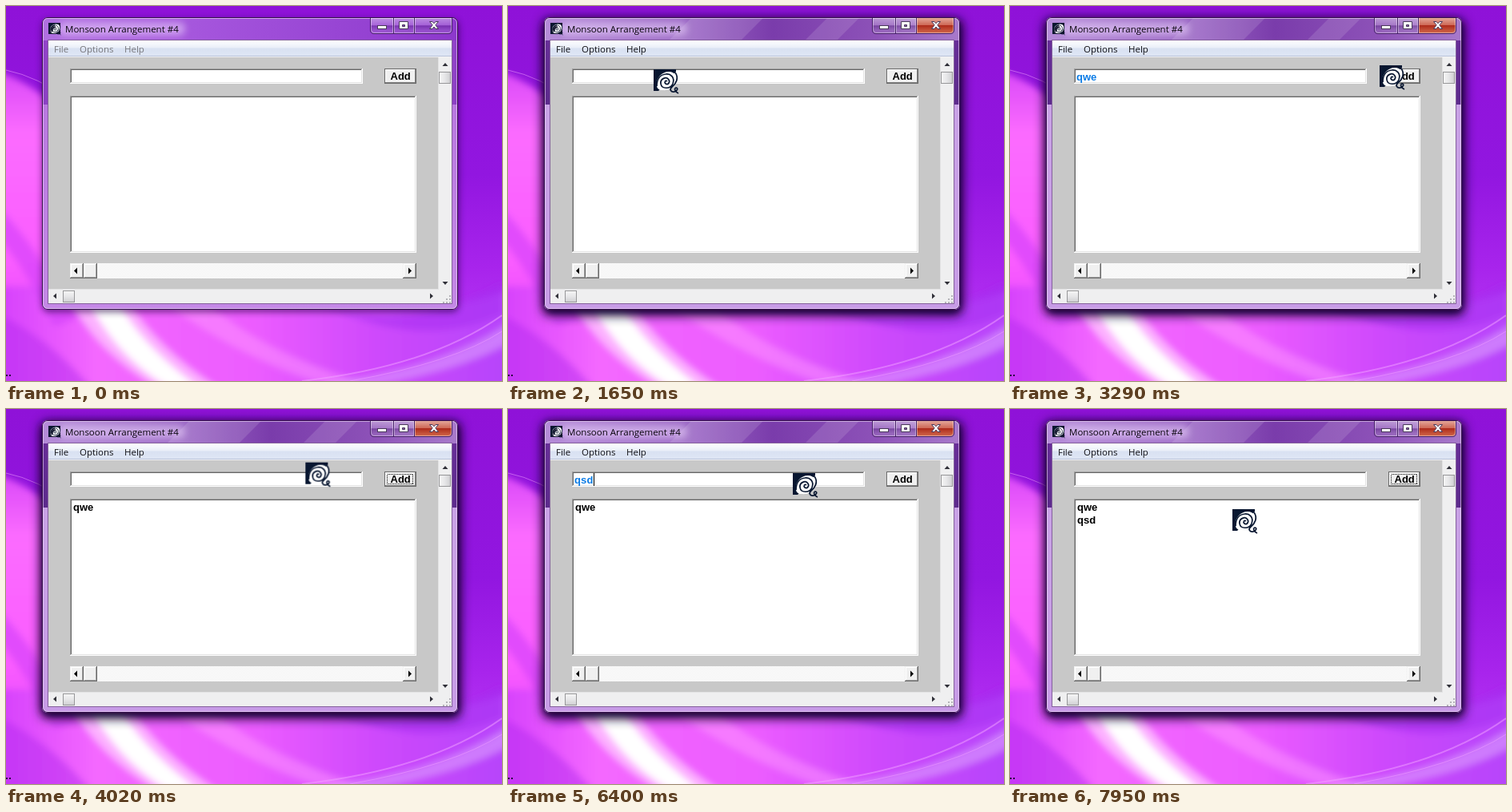
An HTML page that plays this animation: 620 by 468 pixels, repeating every 8000 ms.

```html
<!DOCTYPE html>
<html lang="en">
<head>
<meta charset="utf-8">
<title>Add items to a list</title>
<style>
html, body { margin: 0; width: 100%; height: 100%; overflow: hidden; background: #9a1be0; }
svg { display: block; width: 620px; height: 468px; }
.crisp { shape-rendering: crispEdges; }
.ui { font: 11.5px "Open Sans", "Noto Sans", sans-serif; }
.sys { font: bold 13px "Liberation Sans", Arial, sans-serif; }
.typed { fill: #0a7be6; }

/* every timed part shares one 8 s clock with hard changes */
.t { animation: 8s step-end infinite; }
.t:not(.menu) { opacity: 0; }
.active { animation-name: active; }
.menu { animation-name: menu; fill: #77777c; }
.q { animation-name: q; }
.w { animation-name: w; }
.e { animation-name: e; }
.s { animation-name: s; }
.d { animation-name: d; }
.row1 { animation-name: row1; }
.row2 { animation-name: row2; }
.focus { animation-name: focus; }
.press { animation-name: press; }
.arrow { animation-name: arrow; }
.caret { animation-name: caret; }
.shell { animation-name: show, move; }

@keyframes active { 14% { opacity: 1 } }
@keyframes menu { 14% { fill: #101014 } }
@keyframes q { 26.37%, 64.62% { opacity: 1 } 45.12%, 90.75% { opacity: 0 } }
@keyframes w { 29.25% { opacity: 1 } 45.12% { opacity: 0 } }
@keyframes e { 32.12% { opacity: 1 } 45.12% { opacity: 0 } }
@keyframes s { 73.5% { opacity: 1 } 90.75% { opacity: 0 } }
@keyframes d { 76.5% { opacity: 1 } 90.75% { opacity: 0 } }
@keyframes row1 { 45.12% { opacity: 1 } }
@keyframes row2 { 90.75% { opacity: 1 } }
@keyframes focus { 44.12%, 89.75% { opacity: 1 } 58.87% { opacity: 0 } }
@keyframes press { 44.12%, 89.75% { opacity: 1 } 45.12%, 90.75% { opacity: 0 } }
@keyframes arrow { .87% { opacity: 1 } 1.87% { opacity: 0 } }
@keyframes caret {
  14%, 58.87% { opacity: 1; transform: translateX(0) }
  20.62%, 39%, 70.5%, 83.12% { opacity: 0 }
  26.37%, 64.62% { opacity: 1; transform: translateX(8px) }
  29.25% { opacity: 1; transform: translateX(18px) }
  32.12% { opacity: 1; transform: translateX(26px) }
  73.5% { opacity: 1; transform: translateX(16px) }
  76.5% { opacity: 1; transform: translateX(24px) }
}
@keyframes show {
  1.87%, 33.12%, 79.25% { opacity: 1 }
  26.37%, 64.62% { opacity: 0 }
}
@keyframes move {
  1.87% { transform: translate(395px, 330px); animation-timing-function: steps(3) }
  4.87% { transform: translate(280px, 180px); animation-timing-function: steps(6) }
  10.87% { transform: translate(182px, 77px) }
  12.12% { transform: translate(182px, 76px) }
  16.75% { transform: translate(182px, 75px); animation-timing-function: steps(2) }
  18.75% { transform: translate(182px, 79px) }
  33.12% { transform: translate(190px, 84px); animation-timing-function: steps(4) }
  37.12% { transform: translate(443px, 88px) }
  39% { transform: translate(452px, 80px); animation-timing-function: steps(2) }
  41.12% { transform: translate(462px, 74px); animation-timing-function: steps(2) }
  43.12% { transform: translate(476px, 73px) }
  46.12% { transform: translate(476px, 73px); animation-timing-function: steps(2) }
  48.12% { transform: translate(421px, 72px); animation-timing-function: steps(3) }
  51.25% { transform: translate(351px, 64px) }
  55% { transform: translate(351px, 66px); animation-timing-function: steps(2) }
  56.87% { transform: translate(352px, 73px) }
  58.87% { transform: translate(355px, 75px) }
  60.75% { transform: translate(355px, 76px) }
  61.75% { transform: translate(355px, 77px) }
  79.25% { transform: translate(356px, 80px); animation-timing-function: steps(3) }
  82.12% { transform: translate(392px, 93px); animation-timing-function: steps(6) }
  87.87% { transform: translate(479px, 76px) }
  88.75% { transform: translate(481px, 75px) }
  91.62% { transform: translate(480px, 77px) }
  93.5% { transform: translate(468px, 79px); animation-timing-function: steps(2) }
  95.37% { transform: translate(405px, 90px); animation-timing-function: steps(4) }
  99.37% { transform: translate(278px, 125px) }
}
</style>
</head>
<body>
<svg viewBox="0 0 620 468" width="620" height="468">
<defs>
  <linearGradient id="sky" x2="0" y2="1">
    <stop offset="0" stop-color="#8f12d8"/><stop offset=".45" stop-color="#9216e0"/>
    <stop offset=".7" stop-color="#a824ec"/><stop offset="1" stop-color="#c044fa"/>
  </linearGradient>
  <linearGradient id="left" x2="0" y2="1">
    <stop offset="0" stop-color="#d848f8"/><stop offset=".2" stop-color="#fc6cff"/>
    <stop offset=".6" stop-color="#fa5cff"/><stop offset="1" stop-color="#d038fc"/>
  </linearGradient>
  <linearGradient id="floor">
    <stop offset="0" stop-color="#d23cfc"/><stop offset=".2" stop-color="#f468ff"/>
    <stop offset=".5" stop-color="#ec5cff"/><stop offset=".75" stop-color="#cc48fc"/><stop offset="1" stop-color="#b444fa"/>
  </linearGradient>
  <linearGradient id="idle">
    <stop offset="0" stop-color="#b070e0"/><stop offset=".4" stop-color="#a454dc"/><stop offset="1" stop-color="#8c38cc"/>
  </linearGradient>
  <linearGradient id="glass">
    <stop offset="0" stop-color="#b58cd8"/><stop offset=".35" stop-color="#9a66c4"/>
    <stop offset=".55" stop-color="#7a3cab"/><stop offset=".8" stop-color="#8d52b8"/><stop offset="1" stop-color="#a87acb"/>
  </linearGradient>
  <linearGradient id="side" x2="0" y2="1">
    <stop offset="0" stop-color="#6b2f9c"/><stop offset=".3" stop-color="#5c2a8c"/>
    <stop offset=".3" stop-color="#c9a2e6"/><stop offset="1" stop-color="#c79be6"/>
  </linearGradient>
  <linearGradient id="idleSide" x2="0" y2="1">
    <stop offset="0" stop-color="#9444cc"/><stop offset=".3" stop-color="#8c40c4"/>
    <stop offset=".3" stop-color="#b978e0"/><stop offset="1" stop-color="#c488e6"/>
  </linearGradient>
  <linearGradient id="bar" x2="0" y2="1">
    <stop offset="0" stop-color="#fff"/><stop offset=".45" stop-color="#e9eef8"/>
    <stop offset=".5" stop-color="#d9e1f2"/><stop offset="1" stop-color="#dfe6f5"/>
  </linearGradient>
  <linearGradient id="cap" x2="0" y2="1">
    <stop offset="0" stop-color="#fff" stop-opacity=".4"/><stop offset=".45" stop-color="#fff" stop-opacity=".2"/>
    <stop offset=".5" stop-color="#301050" stop-opacity=".25"/><stop offset="1" stop-color="#fff" stop-opacity=".12"/>
  </linearGradient>
  <linearGradient id="red" x2="0" y2="1">
    <stop offset="0" stop-color="#e3a699"/><stop offset=".45" stop-color="#cf6a58"/>
    <stop offset=".5" stop-color="#ae2c1c"/><stop offset="1" stop-color="#d2694c"/>
  </linearGradient>
  <linearGradient id="thumb">
    <stop offset="0" stop-color="#f6f6f6"/><stop offset=".5" stop-color="#e6e6e8"/><stop offset="1" stop-color="#cfcfd2"/>
  </linearGradient>
  <linearGradient id="thumbH" href="#thumb" x2="0" y2="1"/>
  <filter id="soft" x="-50%" y="-50%" width="200%" height="200%"><feGaussianBlur stdDeviation="7"/></filter>
  <filter id="haze" x="-20%" y="-60%" width="140%" height="220%"><feGaussianBlur stdDeviation="4"/></filter>
  <pattern id="weave" width="2" height="2" patternUnits="userSpaceOnUse">
    <path d="M0 0h2v2h-2z" fill="#fff"/><path d="M0 0h1v1h-1zM1 1h1v1h-1z" fill="#f0f0f0"/>
  </pattern>
  <clipPath id="frame"><rect x="45" y="14" width="520" height="365" rx="7"/></clipPath>
  <g id="swirl">
    <path d="M0 0H28V3L6 27H0Z" fill="#081630"/>
    <path d="M4 20C3 11 10 3 19 3C27 3 31 10 29 16C27 23 18 27 11 26C7 26 4 24 4 20Z" fill="#fff"/>
    <path d="M17 15C15 13 13 16 15 18C18 20 21 16 19 13C16 8 8 12 9 18C10 25 21 25 24 18C27 10 21 5 15 6C7 7 4 14 4 21M27 4C32 11 28 18 23 22C19 25 22 29 26 28C30 27 31 23 28 23C25 24 27 28 31 30" fill="none" stroke="#081630" stroke-width="1.700"/>
  </g>
</defs>

<!-- wallpaper -->
<rect width="620" height="468" fill="url(#sky)"/>
<g filter="url(#haze)">
  <path d="M-20 80Q40 90 130 190V480H-20Z" fill="url(#left)"/>
  <path d="M-20 350H380Q520 400 640 350V490H-20Z" fill="url(#floor)"/>
  <path d="M-10 250Q30 290 90 390L60 400Q20 320-10 290Z" fill="#d040fa" opacity=".6"/>
  <path d="M-10 385Q50 410 110 480H-10Z" fill="#b62cf0" opacity=".5"/>
  <path d="M80 365Q110 430 195 480H270Q190 430 150 365Z" fill="#ffc4ff" opacity=".8"/>
  <path d="M102 365Q135 435 200 474H238Q165 420 138 365Z" fill="#fff"/>
  <path d="M200 370Q290 440 420 480H480Q330 440 250 370Z" fill="#ff9cff" opacity=".45"/>
  <path d="M400 375Q500 410 620 345V385Q520 430 400 375Z" fill="#a42cf0" opacity=".5"/>
  <path d="M400 470Q540 455 630 395V420Q550 465 400 480Z" fill="#dca0ff" opacity=".6"/>
</g>
<g fill="none" stroke="#f4a4ff">
  <path d="M0 80Q40 88 80 118" opacity=".5"/>
  <path d="M370 468Q530 450 620 386" stroke-width="2" opacity=".5"/>
  <path d="M430 468Q560 445 620 406" opacity=".5"/>
</g>
<path class="crisp" d="M0 460h2v2h-2zM4 460h2v2h-2z" fill="#2a0848"/>

<!-- window frame -->
<rect x="45" y="17" width="521" height="365" rx="8" fill="#200040" opacity=".6" filter="url(#haze)"/>
<rect class="t active" x="43" y="16" width="525" height="370" rx="9" fill="#180030" opacity=".8" filter="url(#soft)"/>
<g clip-path="url(#frame)">
  <rect x="45" y="14" width="520" height="365" fill="url(#idleSide)"/>
  <rect x="45" y="14" width="520" height="29" fill="url(#idle)"/>
  <g class="t active">
    <rect x="45" y="14" width="520" height="365" fill="url(#side)"/>
    <rect x="45" y="14" width="520" height="29" fill="url(#glass)"/>
    <path d="M230 14h90l-30 30h-90ZM400 14h40l-30 30h-40Z" fill="#fff" opacity=".12"/>
  </g>
  <rect x="66" y="20" width="158" height="17" rx="8" fill="#f0dcff" opacity=".5" filter="url(#haze)"/>
</g>
<rect x="45.5" y="14.5" width="519" height="364" rx="6.5" fill="none" stroke="#34104c"/>
<rect x="46.5" y="15.5" width="517" height="362" rx="5.5" fill="none" stroke="#f3dcff" opacity=".6"/>
<rect class="crisp" x="52.5" y="42.5" width="505" height="329" fill="#c8c8c8" stroke="#84609c"/>
<g transform="translate(53 21)">
  <rect width="15" height="14" fill="#10142c"/>
  <use href="#swirl" transform="scale(.5)"/>
  <path d="M3 13Q2 5 8 3M5 11Q4 6 9 5" fill="none" stroke="#10142c" stroke-width="1.500"/>
</g>
<text class="ui" x="74" y="33" fill="#08040c">Monsoon Arrangement #4</text>

<!-- caption buttons -->
<path d="M455.5 15V30Q455.5 34.5 460 34.5H553Q557.5 34.5 557.5 30V15Z" fill="url(#cap)"/>
<path class="t active" d="M511 15V34H553Q557 34 557 30V15Z" fill="url(#red)"/>
<path d="M455.5 15V30Q455.5 34.5 460 34.5H553Q557.5 34.5 557.5 30V15M484.5 15V34M510.5 15V34" fill="none" stroke="#47206a"/>
<path d="M456.5 15V30Q457 33.5 460 33.5H483.5V15M485.5 15V33.5H509.5V15M511.5 15V33.5H553Q556.5 33 556.5 30V15" fill="none" stroke="#fff" opacity=".4"/>
<g fill="#fff" stroke="#4b3a5c">
  <rect x="464.5" y="24.5" width="11" height="4"/>
  <path d="M491.5 19.5h11v9h-11ZM495.5 23.5h3v2h-3Z" fill-rule="evenodd"/>
  <path d="M529.500 19.500h3.500l2 2.300l2-2.300h3.500l-3.700 4.300l3.700 4.700h-3.500l-2-2.500l-2 2.500h-3.500l3.700-4.700Z"/>
</g>

<!-- menu -->
<rect class="crisp" x="53" y="43" width="504" height="20" fill="url(#bar)"/>
<path class="crisp" d="M53 62h504v1h-504z" fill="#b9c3da"/>
<path class="crisp" d="M53 63h504v1h-504z" fill="#f2f2f4"/>
<g class="ui t menu">
  <text x="60" y="58">File</text><text x="92" y="58">Options</text><text x="148" y="58">Help</text>
</g>

<!-- outer scroll bars -->
<g class="crisp">
  <path d="M541 64h16v307H53V354H541Z" fill="#efeff0"/>
  <path d="M540 64h1v290H53v-1H540Z" fill="#e2e2e4"/>
  <rect x="541.5" y="82.500" width="14" height="14" fill="url(#thumb)" stroke="#979799"/>
  <rect x="71.5" y="355.5" width="14" height="14" fill="url(#thumbH)" stroke="#979799"/>
  <path d="M554 361h2v2h-2zM550 365h2v2h-2zM554 365h2v2h-2zM546 369h2v2h-2zM550 369h2v2h-2zM554 369h2v2h-2z" fill="#b4b4b8"/>
</g>
<path d="M545.500 75l3.500-4l3.500 4ZM545.500 344l3.500 4l3.500-4ZM63 358.500l-4 3.500l4 3.500ZM530 358.500l4 3.500l-4 3.500Z" fill="#303038"/>

<!-- edit field and list -->
<g class="crisp">
  <path d="M80 78h366v19H80ZM80 112h433v196H80Z" fill="#fff"/>
  <path d="M80 78h365v1H81v17h-1ZM80 112h432v1H81v194h-1Z" fill="#a0a0a0"/>
  <path d="M81 79h363v1H82v15h-1ZM81 113h430v1H82v192h-1Z" fill="#696969"/>
  <path d="M444 79h1v17H81v-1H444ZM511 113h1v194H81v-1H511Z" fill="#e3e3e3"/>
</g>
<g class="sys typed">
  <text class="t q" x="83" y="93">q</text>
  <text class="t w" x="91" y="93">w</text><text class="t e" x="101" y="93">e</text>
  <text class="t s" x="91" y="93">s</text><text class="t d" x="98.500" y="93">d</text>
</g>
<rect class="t caret crisp" x="83" y="80" width="1" height="16"/>
<g class="sys">
  <text class="t row1" x="84" y="127">qwe</text>
  <text class="t row2" x="84" y="143">qsd</text>
</g>

<!-- inner scroll bar -->
<g class="crisp">
  <rect x="80" y="321" width="433" height="19" fill="url(#weave)"/>
  <path d="M80 321h17v19H80ZM97 321h17v19H97ZM496 321h17v19H496Z" fill="#f0f0f0"/>
  <path d="M96 321h1v19H80v-1H96ZM113 321h1v19H97v-1H113ZM512 321h1v19H496v-1H512Z" fill="#696969"/>
  <path d="M95 322h1v17H81v-1H95ZM112 322h1v17H98v-1H112ZM511 322h1v17H497v-1H511Z" fill="#a0a0a0"/>
  <path d="M81 322h14v1H82v15h-1ZM98 322h14v1H99v15h-1ZM497 322h14v1H498v15h-1Z" fill="#fff"/>
</g>
<path d="M89 326.500v8l-4-4ZM503 326.500v8l4-4Z"/>

<!-- Add button -->
<g class="crisp">
  <rect x="473.5" y="78.5" width="39" height="18" fill="#f0f0f0" stroke="#696969"/>
  <path d="M474 79h37v1H475v15h-1Z" fill="#fff"/>
  <path d="M511 79h1v17H474v-1H511Z" fill="#808080"/>
</g>
<text class="sys" x="480.500" y="92">Add</text>
<g class="t press">
  <rect class="crisp" x="473.5" y="78.500" width="39" height="18" fill="#f0f0f0" stroke="#696969"/>
  <text class="sys" x="481.500" y="93">Add</text>
</g>
<rect class="t focus crisp" x="476.5" y="81.500" width="32" height="12" fill="none" stroke="#000" stroke-dasharray="1 1"/>

<!-- pointers -->
<path class="t arrow" d="M448.500 414.500v16l3.700-3.500l2.500 5.500l2.300-1l-2.500-5.500h5Z" fill="#fff" stroke="#000"/>
<g class="t shell"><use href="#swirl"/></g>
</svg>
</body>
</html>
```
